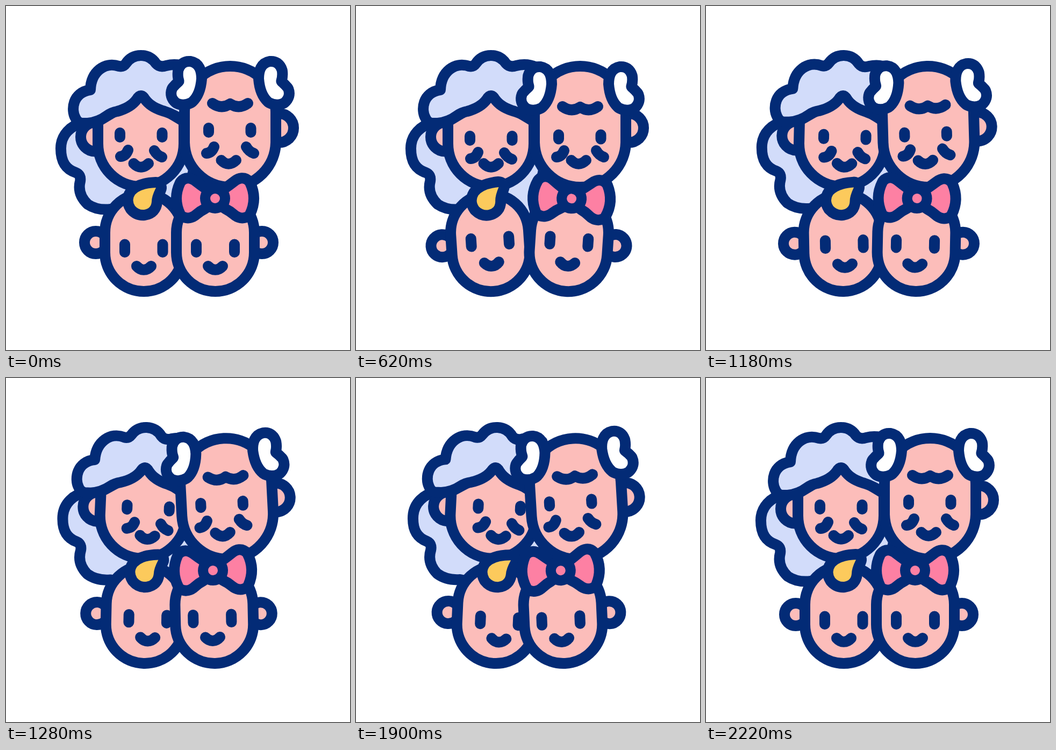
An HTML page for the animation above (2400 ms loop, 640 by 640 pixels).

```html
<!DOCTYPE html>
<html lang="en">
<head>
<meta charset="utf-8">
<title>Family</title>
<style>
  html, body { margin: 0; width: 100%; height: 100%; overflow: hidden; background: #fff; }
  svg { display: block; width: 100%; height: 100%; }
  .line { fill: none; stroke: #032b76; stroke-width: 20; stroke-linecap: round; stroke-linejoin: round; }
  .skin { fill: #fcbdba; }
  .hair { fill: #d2dcfa; }
  /* outline sits wholly outside the coloured shape */
  .rim { stroke: #032b76; stroke-width: 40; stroke-linejoin: round; paint-order: stroke; }
  .white { fill: #fff; }
  .gold { fill: #fcca5c; }
  .pink { fill: #fd80a3; }
  .ink { fill: #032b76; }
</style>
</head>
<body>
<svg viewBox="0 0 640 640">
  <defs>
    <path id="tuft" d="M342 113Q354 115 354 135Q352 160 340 171Q330 176 322 172Q315 166 318 158Q322 153 328 148Q333 143 331 136Q329 130 330 122Q333 112 342 113Z"/>
    <path id="wing" d="M333 333Q338 327 347 334Q356 341 366 348V368Q356 373 348 380Q340 387 333 383Q321 358 333 333Z"/>
  </defs>

  <g id="grandma">
    <path class="line hair" d="M145 216C120 222 102 240 102 265C102 291 112 304 130 310Q140 314 138 326Q132 350 152 369Q170 381 195 378L330 400L350 300L340 215Z"/>
    <circle class="line skin" cx="166" cy="243.5" r="27"/>
    <path class="line skin" d="M171 215V256A80 80 0 0 0 331 256V215L251 167Z"/>
    <path class="line hair" d="M152 218H140Q132 216 129 208C121 194 123 161 157 156C158 122 184 103 210 112Q218 114 223 107Q233 92 251 92Q269 92 279 107Q286 115 298 111Q318 106 335 114L345 200L331 215Q314 202 295 196Q270 189 259 174Q255 167 251 167Q247 167 243 174Q232 189 207 196Q196 198 188 204Q172 216 152 218Z"/>
    <path class="line" data-part="eyes" d="M212 236v8M290.500 236v8"/>
    <path class="line" data-part="cheeks" d="M227 268Q223 279 213 280M276 269Q281 278 290 281"/>
    <path class="line" data-part="mouth" d="M237.500 293C246 302 256 302 265 293"/>
  </g>

  <g id="grandpa">
    <circle class="line skin" cx="508" cy="227" r="27"/>
    <rect class="line skin" x="332" y="112" width="170" height="225" rx="85"/>
    <path class="line" data-part="brow" d="M384 181Q401 193 417 182Q433 193 450 181"/>
    <path class="line" data-part="eyes" d="M377 227v8M455.500 227v8"/>
    <path class="line" data-part="cheeks" d="M387 262Q383 273 373 274M447 262Q452 271 461 274"/>
    <path class="line" data-part="mouth" d="M400.500 287C409 296 419 296 428 287"/>
    <g data-part="tufts">
      <use href="#tuft" class="rim white"/>
      <use href="#tuft" class="rim white" transform="matrix(-1 0 0 1 834 0)"/>
    </g>
  </g>

  <g id="boy">
    <circle class="line skin" cx="167" cy="440" r="21"/>
    <rect class="line skin" x="184" y="349" width="145" height="182" rx="72.500"/>
    <path class="line" data-part="eyes" d="M221 443.500v14.500M291.500 443.500v14.500"/>
    <path class="line" data-part="mouth" d="M243 484C251 493 262 493 270 484"/>
    <path class="rim gold" d="M279 338Q251 339 240 351Q233 361 240 372Q247 380 257 379Q270 377 271 364Q271 354 279 338Z"/>
  </g>

  <g id="girl">
    <circle class="line skin" cx="476" cy="440" r="21"/>
    <rect class="line skin" x="317" y="349" width="145" height="182" rx="72.500"/>
    <path class="line" data-part="eyes" d="M354 443.500v14.500M425 443.500v14.500"/>
    <path class="line" data-part="mouth" d="M376 484C384 493 395 493 403 484"/>
    <use href="#wing" class="rim pink"/>
    <use href="#wing" class="rim pink" transform="matrix(-1 0 0 1 778 0)"/>
    <circle class="ink" cx="389" cy="358" r="28"/>
    <circle class="pink" cx="389" cy="358" r="9"/>
  </g>
</svg>
<script>
  const LOOP = 2400, STEP = 20, MOVE = 420;
  const STARTS = [200, 1000, 1800];

  // Each triple holds the values for the rest, up and sideways poses.
  const still = [0, 0, 0];
  const people = {
    grandma: {
      pivot: [255, 345], turn: [0, 0, 3.3],
      parts: {
        eyes: [[0, 0, 12], [0, 6, 0]],
        cheeks: [[0, 0, 12], [0, 4, 0]],
        mouth: [[0, 0, 13], still]
      }
    },
    grandpa: {
      pivot: [417, 346], turn: [0, 0, -4],
      parts: {
        brow: [still, [0, 6, 0]],
        eyes: [[0, 0, -12], [0, 12.5, 0]],
        cheeks: [[0, 0, -12], [0, 7, 0]],
        mouth: [[0, 0, -11], still],
        tufts: [still, [0, 10, 0]]
      }
    },
    boy: {
      pivot: [256.5, 541], turn: [0, -3.8, 3],
      parts: {
        eyes: [[0, 0, 7.5], [0, -13, 0.5]],
        mouth: [[0, 0, 8], [0, -7, 0.5]]
      }
    },
    girl: {
      pivot: [389.5, 541], turn: [0, 3.8, -3],
      parts: {
        eyes: [[0, 0, -5], [0, -13, 0]],
        mouth: [[0, 0, -5], [0, -7, 0]]
      }
    }
  };

  for (const [id, person] of Object.entries(people)) {
    person.node = document.getElementById(id);
    person.nodes = {};
    for (const name in person.parts) {
      person.nodes[name] = person.node.querySelector(`[data-part=${name}]`);
    }
  }

  const ease = p => p * p * (3 - 2 * p);
  const progress = (t, start) => ease(Math.min(1, Math.max(0, (t - start) / MOVE)));

  function draw(t) {
    const [up, side, back] = STARTS.map(start => progress(t, start));
    const mix = ([a, b, c]) => a + (b - a) * up + (c - b) * side + (a - c) * back;
    for (const { node, nodes, pivot, turn, parts } of Object.values(people)) {
      node.setAttribute('transform', `rotate(${mix(turn)} ${pivot})`);
      for (const name in parts) {
        const [dx, dy] = parts[name].map(mix);
        nodes[name].setAttribute('transform', `translate(${dx} ${dy})`);
      }
    }
  }

  const begin = performance.now();
  function tick() {
    const t = (performance.now() - begin) % LOOP;
    draw(Math.floor(t / STEP) * STEP);
    requestAnimationFrame(tick);
  }
  tick();
</script>
</body>
</html>
```
